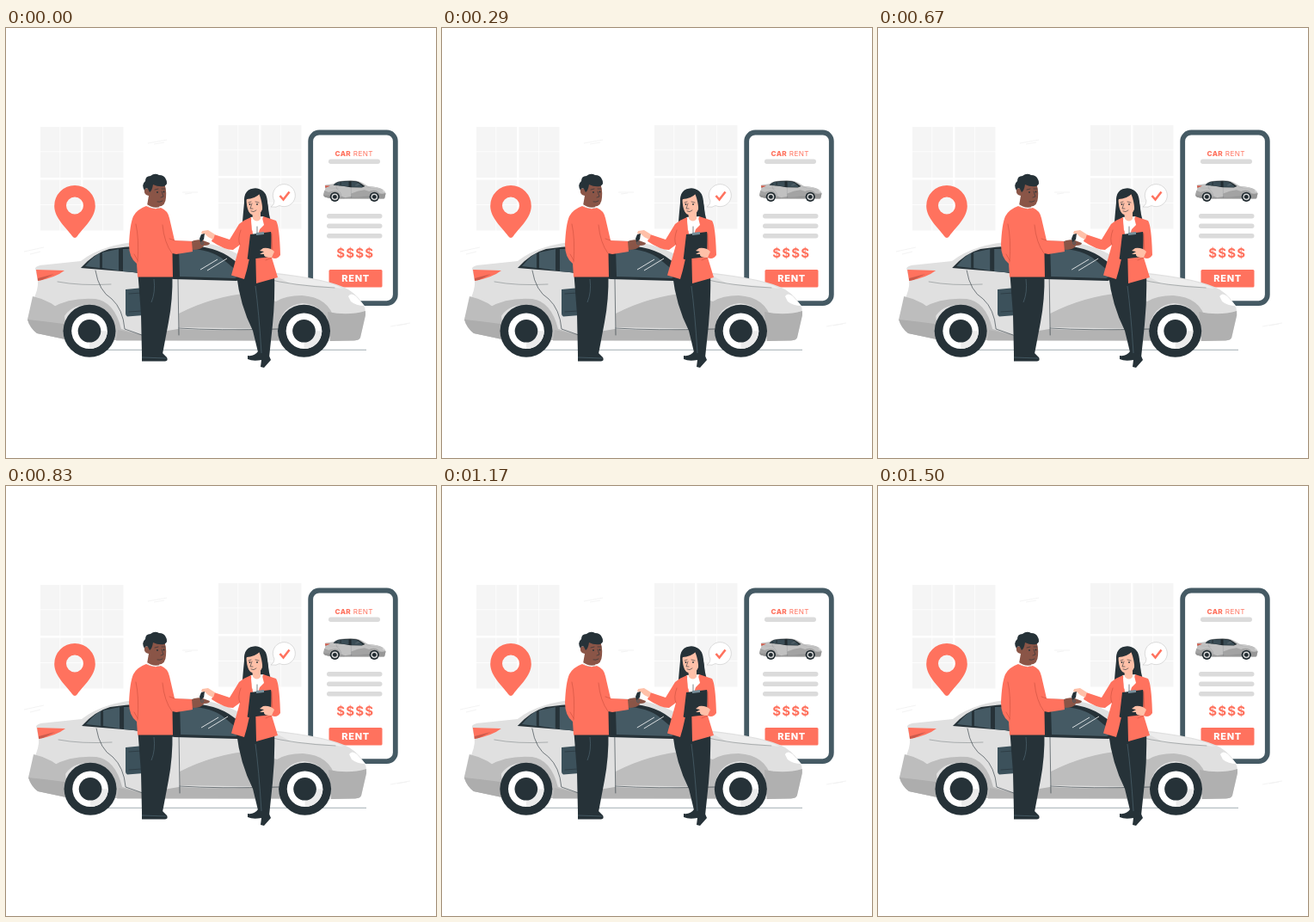
Write an HTML page that moves like this. It is 500 px wide and 500 px high and loops after 1540 ms.

```html
<!DOCTYPE html>
<html lang="en">
<head>
<meta charset="utf-8">
<title>Car rent</title>
<style>
html, body { margin: 0; width: 100%; height: 100%; overflow: hidden; background: #fff; }
svg { display: block; width: 100%; height: 100%; }
text { font-family: Inter, "Open Sans", sans-serif; text-anchor: middle; }
.coral { fill: #ff725e; }
.dark { fill: #263238; }
.glass { fill: #455a64; }
.bag { fill: #3c515b; }
.skin { fill: #ffc0a8; }
.brown { fill: #8a5547; }
.line { fill: none; stroke: #263238; stroke-width: .6; stroke-linecap: round; stroke-linejoin: round; }
.fold { fill: none; stroke: #c9503f; stroke-width: .6; stroke-linecap: round; }
.seam { fill: none; stroke: #546e7a; stroke-width: .6; }
</style>
</head>
<body>
<svg viewBox="0 0 500 500">
  <defs>
    <g id="panes" fill="#f5f5f5">
      <path d="M0 0H22.5V28.500H0ZM23.200 0H47V28.500H23.200ZM0 29.200H22.500V59H0ZM23.200 29.200H47V59H23.200Z"/>
    </g>
    <g id="window">
      <use href="#panes"/><use href="#panes" x="49.500"/>
      <use href="#panes" y="61.500"/><use href="#panes" x="49.500" y="61.500"/>
    </g>
    <g id="wheel">
      <circle r="30.500" class="dark"/>
      <circle r="20.800" fill="#fff"/>
      <path d="M0 20.800A20.800 20.800 0 0 0 20.800 0H13Q12 11 0 13Z" fill="#ebebeb"/>
      <circle r="13.300" class="dark"/>
    </g>
    <g id="car">
      <path fill="#e0e0e0" d="M34 279Q37 275.500 44 275.500L87 271Q112 251 160 248L205 247Q245 248 275 266L305 284Q375 291 398 304Q412 313 417.500 326L418 334L412 360Q411 363 405 363.500L378 364L130 363L68 362L36 355Q28 349 25 339L31 318Q38 303 37 294Z"/>
      <path fill="#bdbdbd" d="M31 312Q54 317 68 333L70 362L36 355Q28 349 25 339Z"/>
      <path fill="#adadad" d="M25 339Q45 341 67 344L69 362L36 355Q28 349 25 339Z"/>
      <path fill="#bdbdbd" d="M54 325Q74 313 104 315Q126 318 134 350L158 357V363H122Q130 326 97 322Q75 321 66 338Z"/>
      <path fill="#b3b3b3" d="M130 351L158 357L200 350Q250 353 318 349V363.500H128Z"/>
      <path fill="#bdbdbd" d="M201 332Q240 312 284 308L314 318Q325 311 344 311Q376 313 382 340L378 352Q372 322 345 320Q320 322 316 350L201 348Z"/>
      <path fill="#b0b0b0" d="M374 330Q398 335 418 329V334L412 360Q411 363 405 363.500L377 364Z"/>
      <path fill="#ededed" d="M310 286Q372 292 392 303Q360 299 330 297Z"/>
      <path class="dark" d="M87 279Q102 262 120 257Q156 252 196 252Q238 252 258 265L288 286L268 294L195 292L147 284Z"/>
      <path class="glass" d="M92 277Q103 264 109 262V279ZM112 261L131 257V282L112 279ZM136 257L185 256V287L136 283ZM201 256Q234 256 250 267L274 287L266 291L202 289Z"/>
      <path d="M226 281L246 269M234 282L257 268" stroke="#fff" stroke-width=".8"/>
      <path class="line" d="M104 282Q108 306 123 315Q136 327 138 350L158 357M200 292L201 357M201 349Q245 352 316 350"/>
      <path class="line" stroke-opacity=".5" d="M60 295Q86 300 122 298M300 291Q335 300 382 302"/>
      <path class="coral" d="M35 281L68 282Q58 290 37 294Z"/>
      <path d="M37 291L56 286L42 293L37 294Z" fill="#cb5a4b"/>
      <path fill="#fff" d="M398 312Q401 307 407 312L417 323Q407 323 401 318Z"/>
      <use href="#wheel" x="97" y="352.300"/><use href="#wheel" x="346.500" y="352.300"/>
    </g>
  </defs>

  <rect width="500" height="500" fill="#fff"/>
  <use href="#window" x="40" y="115"/><use href="#window" x="247" y="113"/>
  <path fill="none" stroke="#f0f0f0" stroke-width=".8" d="M165 134L187 130M172 135L184 133M205 191H223M208 193L216 192M21 260L44 255M28 263L40 260M447 347L470 343M455 346L466 344"/>

  <path class="coral" fill-rule="evenodd" d="M80 183A23.800 23.800 0 0 1 103.800 207C103.800 221 90 232 83 242Q80 246 77 242C70 232 56.200 221 56.200 207A23.800 23.800 0 0 1 80 183ZM80 196.500A10 10 0 1 0 80 216.500A10 10 0 1 0 80 196.500Z"/>

  <g id="phone">
    <rect x="354.200" y="121.500" width="98.600" height="198.600" rx="10" fill="#fff" stroke="#455a64" stroke-width="5.800"/>
    <text x="404.700" y="148.600" font-size="8.200" letter-spacing=".35" class="coral"><tspan font-weight="800">CAR</tspan> RENT</text>
    <g fill="#dbdbdb">
      <rect x="375" y="152.500" width="60" height="5.500" rx="2.700"/>
      <rect x="373" y="216" width="64.500" height="5.500" rx="2.700"/>
      <rect x="373" y="227.500" width="64.500" height="5.500" rx="2.700"/>
      <rect x="373" y="239" width="64.500" height="5.500" rx="2.700"/>
    </g>
    <use href="#car" transform="translate(364.500 131.500) scale(.184)" style="filter: brightness(.86)"/>
    <text x="406.300" y="266.500" font-size="15" font-weight="700" letter-spacing="1.200" class="coral">$$$$</text>
    <rect x="375.500" y="281" width="62" height="20.500" rx="1.500" class="coral"/>
    <text x="406.700" y="295" font-size="11" font-weight="800" letter-spacing=".7" fill="#fff">RENT</text>
  </g>

  <path d="M80 374.300H419" stroke="#455a64" stroke-width=".5"/>
  <use href="#car" id="movingCar"/>

  <g id="bubble">
    <path d="M312 201Q312 206 308 208Q315 209 318 206.500A13 13 0 1 0 312 201Z" fill="#fff" stroke="#c7c7c7" stroke-width=".6"/>
    <path d="M318.500 195L322.500 199.500L329.500 190.500" fill="none" stroke="#ff725e" stroke-width="2.600"/>
  </g>

  <g id="man">
    <path class="bag" d="M139 304L160 302V334L141 335.500Q139 335 139 332Z"/>
    <path class="line" d="M143 309L158 308M143 330L158 329"/>
    <path class="dark" d="M153.500 287H193.500Q194 316 189 342L182 379H158L157 333Z"/>
    <path class="dark" d="M158 376H180L187 383Q189 387 185 387.500H158Z"/>
    <path class="seam" d="M172 292Q174 307 169 319M158 383L186 384"/>
    <path class="brown" d="M214 249Q221 245 229 247L237 250Q237 253 230 253Q229 258 215 258Z"/>
    <path class="coral" d="M163 207Q172 212 180 209Q188 212 190 221L196 247L216 248L217 260L198 263L193.500 262L194 289.500H153L152 274Q143 267 143 252Q144 228 148 219Q152 211 163 207Z"/>
    <path class="fold" d="M151 228Q155 245 153 272M182 229Q184 250 193 262M196 247L190 245M153 270L149 263"/>
    <path class="brown" d="M164 181L183 179Q187 186 186 197Q185.500 207 178 207.500L179 209Q172 212 164 206.500L166 195Q160 194 161 188Q162 185 165 187Z"/>
    <path d="M163.500 205.500Q171 211 179.500 208.500" fill="none" stroke="#fff" stroke-width="1.200"/>
    <path class="dark" d="M161 189Q157 182 162 178Q162 172 168 172Q173 168 178 171Q184 171 186 176Q189 181 184 184Q177 185 171 182Q170 189 167 191L165 187Q162 185 161 189Z"/>
    <path class="line" d="M173 188L177 187M181 187L185 187M181 190L183 196L180 197M176 202Q179 203 182 201"/>
    <circle cx="176" cy="191" r=".9" class="dark"/><circle cx="183.500" cy="190.500" r=".9" class="dark"/>
  </g>

  <g id="woman">
    <path class="dark" d="M275 225Q276 213 277 203Q276 186.500 290 186.500Q303 187 304 202Q305 216 309 229Q297 234 286 227Z"/>
    <path class="dark" d="M268 287L281 262H306L312 284Q313 315 310 345L306 383L295 385L287 352Q272 322 268 287Z"/>
    <path class="dark" d="M293 376L305 379L308 386L300 395L296 394L297 386Q287 388 281 385V381Q289 382 293 376Z"/>
    <path class="seam" d="M290 300Q294 330 297 378"/>
    <path fill="#fff" d="M284 220L300 219L302 262H281Z"/>
    <path class="skin" d="M286 212H296V222Q292 227 287 222Z"/>
    <path class="skin" d="M279.500 199Q289 199 296 192Q300 201 298 211Q295 218.500 288 217.500Q280 217 279.500 199Z"/>
    <path class="dark" d="M277 205Q278 198 287 195L293 191Q298 198 299 219L306 226Q305 202 301 193Q297 187 290 186.500Q277 187 277 205Z"/>
    <path class="line" d="M282 203L285 202M290 202L294 203M286 204L284 210L287 210M285 213Q288 215 291 212"/>
    <circle cx="283.500" cy="205" r=".9" class="dark"/><circle cx="292" cy="205" r=".9" class="dark"/>
    <path class="coral" d="M285 220Q277 223 271 228L260 246L242 240L239 248Q254 258 264 258L272 252L262 287.500L277 292Q284 270 287 240Z"/>
    <path class="coral" d="M299 219L314 224Q318 230 319 264Q315 270 309 267L316 290L291 297L290 252Z"/>
    <path d="M285 222L291 230L298 221L300 229L294 235L291 231L286 236Z" fill="#fff"/>
    <path class="line" d="M292 231V247"/>
    <path class="fold" d="M273 235Q269 246 272 252M309 239L310 264M309 267L302 270"/>
    <path class="dark" d="M284 240L308 237Q309 238 308 266L282 269Q280 269 281 266Z"/>
    <path d="M291 238L300 237L300 240L291 241Z" fill="#78909c"/>
    <path class="skin" d="M312 260Q307 255 299 256L295 259L300 260L295 263L300 263Q299 267 309 267Z"/>
    <path class="skin" d="M243 240L235 235L228 236L227 239L232 240L235 243L241 246Z"/>
    <path class="dark" d="M227 240L231 239L230 246L226 249L225 245Z"/>
    <circle cx="228" cy="250" r="1.500" fill="none" stroke="#455a64" stroke-width=".8"/>
  </g>
</svg>
<script>
const LOOP = 1540, SHAKE = 1520;
const stops = [0, -.5, 1, -2, 2, -2, 2, -2, 1, -.5, 0];
const car = document.getElementById('movingCar');

const bezier = (s, a, b) => 3 * (1 - s) ** 2 * s * a + 3 * (1 - s) * s * s * b + s ** 3;

// CSS "ease": cubic-bezier(.25, .1, .25, 1)
function ease(p) {
  let low = 0, high = 1;
  for (let i = 0; i < 20; i++) {
    const mid = (low + high) / 2;
    if (bezier(mid, .25, .25) < p) low = mid; else high = mid;
  }
  return bezier(low, .1, 1);
}

function shakeAt(time) {
  const pos = Math.min(time / SHAKE, 1) * (stops.length - 1);
  const i = Math.min(Math.floor(pos), stops.length - 2);
  return stops[i] + (stops[i + 1] - stops[i]) * ease(pos - i);
}

const start = performance.now();
function draw() {
  const time = (performance.now() - start) % LOOP;
  car.setAttribute('transform', `translate(${shakeAt(time).toFixed(3)} 0)`);
  requestAnimationFrame(draw);
}
draw();
</script>
</body>
</html>
```
